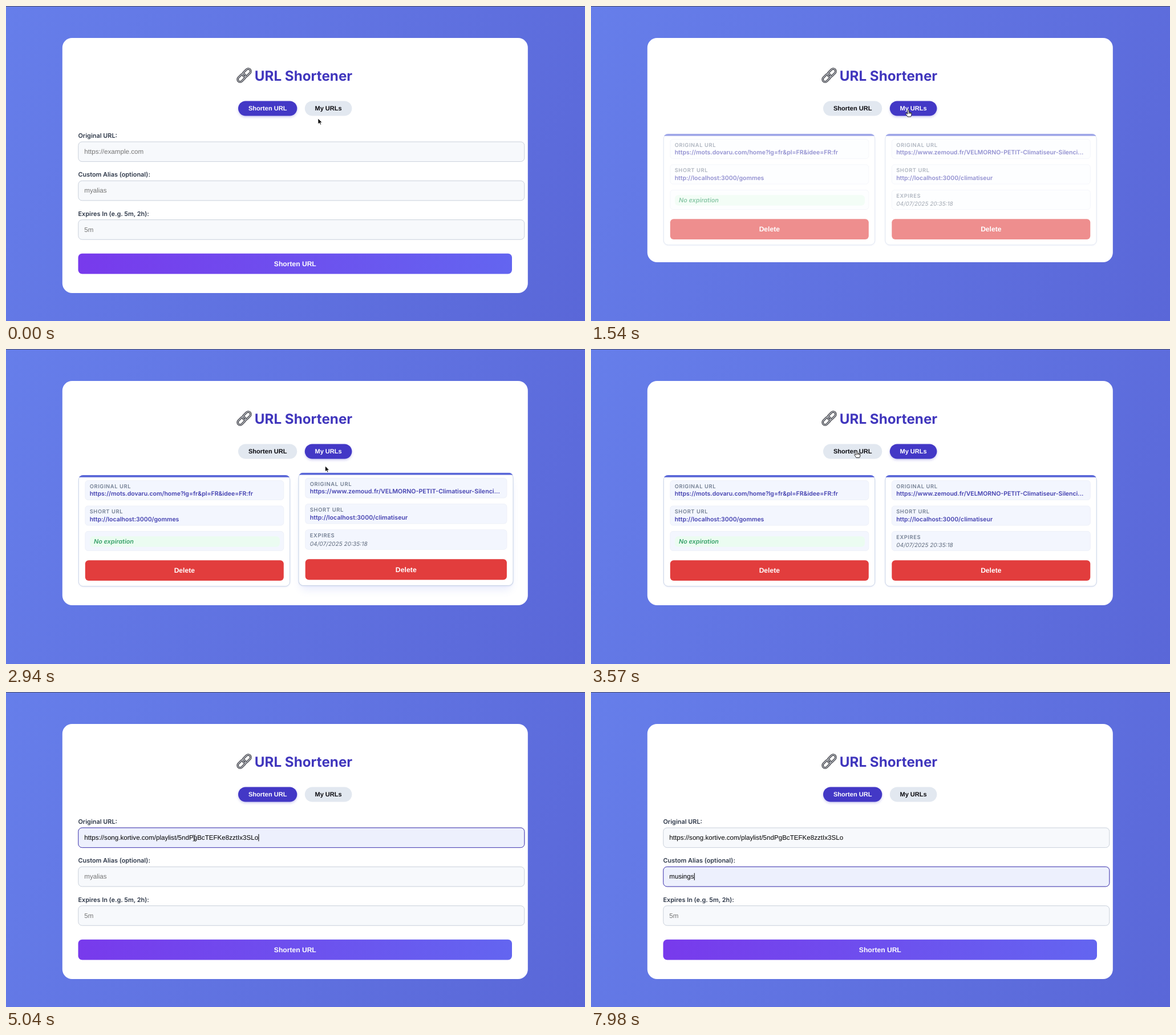
Animation, 1015 px wide and 552 px high, one loop 8 s. Source, as an HTML page:

```html
<!DOCTYPE html>
<html lang="en">
<head>
<meta charset="utf-8">
<title>URL Shortener</title>
<style>
html, body { margin: 0; width: 100%; height: 100%; overflow: hidden; }
body { background: linear-gradient(120deg, #667eea, #5a67d8); }
svg { display: block; width: 1015px; height: 552px; }
text { font-family: Inter, sans-serif; font-optical-sizing: none; text-rendering: geometricPrecision; white-space: pre; }
.title { font-size: 24.2px; font-weight: 700; fill: #4036bd; text-anchor: middle; }
.btn { font: bold 12.1px "Liberation Sans", Arial, sans-serif; fill: #fff; text-anchor: middle; }
.tab { font-size: 11.05px; }
.label { font-size: 10.9px; font-weight: 600; fill: #2d3748; }
.field { font: 11.6px "Liberation Sans", Arial, sans-serif; fill: #000; }
.hint { fill: #757575; }
.cap { font-size: 9.3px; font-weight: 600; letter-spacing: .62px; fill: #737f92; }
.link { font-size: 10.5px; font-weight: 600; fill: #4340b0; }
.none { font-size: 10.8px; font-weight: 600; font-style: italic; fill: #38a169; }
.date { font-size: 10px; font-style: italic; fill: #5f6b7d; }
.tip { font-size: 8.8px; font-weight: 500; fill: #fff; }
.lit { filter: drop-shadow(0 2px 2px rgba(67, 56, 202, .28)); }
</style>
</head>
<body>
<svg id="stage" viewBox="0 0 1015 552"></svg>
<script>
const LOOP = 8000, TICK = 70;
const SHOW_LIST = 1365, SHOW_FORM = 3710, PASTE = 4830, FOCUS_ALIAS = 5460;
const PASTED = 'https://song.kortive.com/playlist/5ndPgBcTEFKe8zztIx3SLo';
const ALIAS = 'musings';
const KEYS = [6580, 6930, 7210, 7280, 7420, 7700, 7980];

// time, x, y
const POINTER = [
  [210, 547, 197], [420, 574, 163], [490, 574, 163], [700, 600, 392],
  [980, 600, 392], [1260, 556, 181.5], [1820, 556, 181.5], [2170, 400, 290],
  [2310, 410, 300], [2590, 625, 320], [2660, 625, 320], [2940, 559.5, 205],
  [3430, 476, 172], [3500, 476, 172], [3570, 466, 178], [3640, 466, 178],
  [3990, 375, 233.5], [4270, 330, 256], [5040, 330, 256], [5390, 272, 325.5]
];
const SHAPES = [
  [0, 'arrow'], [630, 'beam'], [1050, 'arrow'], [1190, 'hand'], [1890, 'arrow'],
  [3360, 'hand'], [3780, 'arrow'], [4060, 'beam'], [PASTE, ''], [5040, 'beam'],
  [5180, 'arrow'], [5320, 'beam'], [6580, '']
];
const HOVER = [
  [[4060, 0], [4200, 1], [5040, 1], [5320, 0]],
  [[5250, 0], [5460, 1]],
  [[560, 0], [700, 1], [1190, 1], [1400, 0]]
];
const FOCUS = [
  [[4270, 0], [4480, 1], [FOCUS_ALIAS, 1], [5670, 0]],
  [[FOCUS_ALIAS, 0], [5670, 1]],
  [[0, 0]]
];
const LIFT = [
  [[2030, 0], [2240, 1], [2380, 1], [2590, 0]],
  [[2380, 0], [2590, 1], [2940, 1], [3150, 0]]
];

const rect = (x, y, w, h, r, fill, more = '') =>
  `<rect x="${x}" y="${y}" width="${w}" height="${h}" rx="${r}" fill="${fill}" ${more}/>`;
const text = (x, y, cls, str, more = '') =>
  `<text x="${x}" y="${y}" class="${cls}" ${more}>${str.replace(/&/g, '&amp;')}</text>`;

function tab(id, x, w, str) {
  return rect(x, 166.5, w, 26, 13, '#e2e8f0', `id="${id}"`) +
    text(x + w / 2, 183, 'btn tab', str, `id="${id}Text"`);
}

function field(i, label, hint) {
  const y = 238 + i * 68.3;
  const box = (fill, line, id) =>
    rect(126.8, y, 782, 34.6, 6.5, fill, `stroke="${line}" id="${id + i}"`);
  return text(126.5, y - 7, 'label', label) +
    box('#f7f9fc', '#c9d0db', 'base') + box('#f3f6ff', '#a09ed6', 'hover') +
    box('#edf0fd', '#4a40b4', 'focus') +
    text(137.3, y + 21, 'field hint', hint, `id="input${i}"`);
}

function card(i, x, url, short, last) {
  const item = y => rect(11.8, y, 348, 34, 5, '#f3f6fe', 'class="item" stroke="#eef1f9"');
  return `<g id="card${i}" data-x="${x}">
    ${rect(3, 11, 365, 192, 10, '#667eea', `id="glow${i}" style="filter:blur(7px)"`)}
    ${rect(.3, .8, 370.4, 194, 8, '#fff', 'stroke="#c9d4e6" style="filter:drop-shadow(0 1px 1px rgba(90,103,216,.12))"')}
    <g clip-path="url(#round)">${rect(0, 0, 371, 3.8, 0, '#5a67d8')}</g>
    ${item(9.5)}${item(54)}${item(98.5)}
    ${text(19.7, 22.6, 'cap', 'ORIGINAL URL')}${text(19.7, 36, 'link', url)}
    ${text(19.7, 67.4, 'cap', 'SHORT URL')}${text(19.7, 81, 'link', short)}
    ${last}
    ${rect(11.8, 149.3, 348, 35.7, 6, '#e23d3d')}${text(185.8, 171.4, 'btn', 'Delete')}</g>`;
}

const chain = ['#2f3036" stroke-width="3.6', '#c3c6cd" stroke-width="1.5'].map(paint =>
  [[413, 126], [422, 117]].map(([x, y]) =>
    `<rect x="-8" y="-4.3" width="16" height="8.6" rx="4.3" fill="none"
      transform="translate(${x} ${y}) rotate(-45)" stroke="${paint}"/>`).join('')).join('');

const stage = document.getElementById('stage');
stage.innerHTML = `
  <defs>
    <linearGradient id="violet"><stop stop-color="#783aec"/><stop offset="1" stop-color="#6365f0"/></linearGradient>
    <clipPath id="round"><rect width="371" height="195" rx="8"/></clipPath>
  </defs>
  ${rect(0, 0, 1015, 1, 0, '#454b68')}
  ${rect(98.8, 56, 816, 447, 17, '#fff', 'id="panel"')}
  ${chain}${text(521.5, 130.8, 'title', 'URL Shortener')}
  ${tab('tabForm', 407, 103.3, 'Shorten URL')}${tab('tabList', 523.8, 82.6, 'My URLs')}
  <g id="form">
    ${field(0, 'Original URL:', 'https://example.com')}
    ${field(1, 'Custom Alias (optional):', 'myalias')}
    ${field(2, 'Expires In (e.g. 5m, 2h):', '5m')}
    ${rect(126.5, 433.8, 760.5, 35.8, 7, 'url(#violet)')}${text(506.8, 456, 'btn', 'Shorten URL')}
    <rect id="caret" width="1" height="12.5"/>
    <g id="popup"><path d="M203 348L209 342 215 348Z" fill="#1c1c1d"/>
      ${rect(195, 347.3, 108, 30.6, 4, '#1c1c1d')}${text(203.3, 366, 'tip', 'gommes')}</g>
  </g>
  <g id="list">
    ${card(0, 127, 'https://mots.dovaru.com/home?lg=fr&pl=FR&idee=FR:fr', 'http://localhost:3000/gommes',
      rect(20, 107.2, 333, 18.6, 6, '#ebfcf1') + text(27, 120.4, 'none', 'No expiration'))}
    ${card(1, 515.5, 'https://www.zemoud.fr/VELMORNO-PETIT-Climatiseur-Silenci...', 'http://localhost:3000/climatiseur',
      text(19.7, 112, 'cap', 'EXPIRES') + text(19.7, 126.4, 'date', '04/07/2025 20:35:18'))}
  </g>
  <g id="pointer">
    <path id="arrow" d="M0 0V10L2.4 7.8 4 11.2 5.6 10.4 4.1 7.2H7.2Z" stroke="#fff" stroke-width=".8"/>
    <path id="hand" d="M-1.2 1Q0-.8 1.2 1V4.6L4.6 5.2Q6 5.6 6 7.2 6 10 4.6 12.5H-1Q-2.5 10-4.2 7.8-4.6 6-2.6 6.6L-1.2 8ZM1.2 5V7.4M2.9 5.2V7.4M4.5 5.5V7.4" fill="#fff" stroke="#111" stroke-width=".9"/>
    <path id="beam" d="M-2.4-5.2Q0-5.2 0-3.8 0-5.2 2.4-5.2M0-4V4M-2.4 5.2Q0 5.2 0 3.8 0 5.2 2.4 5.2M-1.2 1.6H1.2" fill="none" stroke="#222"/>
  </g>`;

const el = {};
stage.querySelectorAll('[id]').forEach(node => el[node.id] = node);
const items = stage.querySelectorAll('.item');
const set = (id, name, value) => el[id].setAttribute(name, value);
const show = (id, on) => { el[id].style.display = on ? '' : 'none'; };

// Linear value of one column of a keyed table.
function at(table, t, col = 1) {
  const i = table.findIndex(row => row[0] > t);
  if (i < 0) return table[table.length - 1][col];
  if (i === 0) return table[0][col];
  const a = table[i - 1], b = table[i];
  return a[col] + (b[col] - a[col]) * (t - a[0]) / (b[0] - a[0]);
}

function drawInput(i, value, hint) {
  const node = el['input' + i];
  node.textContent = value || hint;
  node.setAttribute('class', value ? 'field' : 'field hint');
  return 137.3 + (value ? node.getComputedTextLength() + .3 : 0);
}

function drawForm(t) {
  for (let i = 0; i < 3; i++) {
    set('hover' + i, 'opacity', at(HOVER[i], t));
    set('focus' + i, 'opacity', at(FOCUS[i], t));
  }
  const typed = ALIAS.slice(0, KEYS.filter(k => k <= t).length);
  const urlEnd = drawInput(0, t >= PASTE ? PASTED : '', 'https://example.com');
  const aliasEnd = drawInput(1, typed, 'myalias');
  const inAlias = t >= FOCUS_ALIAS;
  set('caret', 'x', inAlias ? aliasEnd : urlEnd);
  set('caret', 'y', inAlias ? 317.3 : 249);
  show('caret', t >= 4340 && t < 5320 || inAlias && t < 6020 || t >= KEYS[0]);
  show('popup', t >= FOCUS_ALIAS && t < KEYS[2]);
}

function drawList(t) {
  const x = Math.min(1, (t - SHOW_LIST) / 500), p = 1 - (1 - x) ** 2;
  set('list', 'opacity', p);
  set('list', 'transform', `translate(0 ${7 * (1 - p)})`);
  items.forEach(node => node.setAttribute('fill-opacity', p ** 3));
  LIFT.forEach((table, i) => {
    const up = at(table, t), left = +el['card' + i].dataset.x;
    set('glow' + i, 'opacity', .13 * up);
    set('card' + i, 'transform', `translate(${left + 185.5} ${318.5 - 2.8 * up})
      scale(${1 + .015 * up}) translate(-185.5 -97.5)`);
  });
}

function draw(t) {
  const list = t >= SHOW_LIST && t < SHOW_FORM;
  set('panel', 'height', list ? 393 : 447);
  show('form', !list);
  show('list', list);
  [['tabForm', !list], ['tabList', list]].forEach(([id, on]) => {
    set(id, 'fill', on ? '#4338c6' : '#e2e8f0');
    set(id, 'class', on ? 'lit' : '');
    el[id + 'Text'].style.fill = on ? '#fff' : '#0b0b10';
  });
  list ? drawList(t) : drawForm(t);
  const shape = SHAPES.filter(s => s[0] <= t).pop()[1];
  ['arrow', 'hand', 'beam'].forEach(id => show(id, id === shape));
  set('pointer', 'transform', `translate(${at(POINTER, t)} ${at(POINTER, t, 2)})`);
}

const start = performance.now();
function loop() {
  const t = (performance.now() - start) % LOOP;
  draw(Math.floor(t / TICK) * TICK);
  requestAnimationFrame(loop);
}
loop();
</script>
</body>
</html>
```
